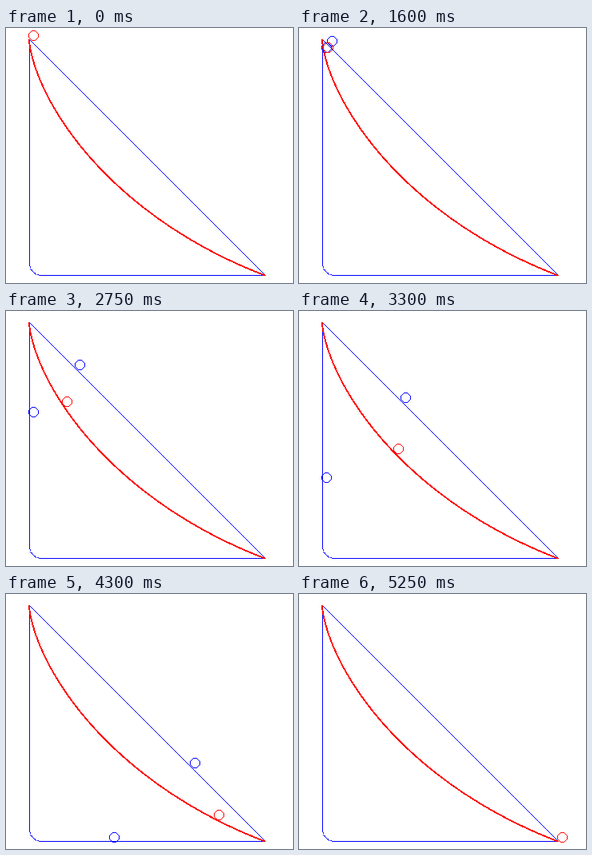
A matplotlib script that plays this animation: 359 px wide and 319 px high, repeating every 7250 ms.

```python
import math

import numpy as np
import matplotlib.pyplot as plt
from matplotlib.animation import FuncAnimation

W, H, DPI = 359, 319, 64
STEP = 50                 # ms per frame
FRAMES = 145
WAIT = 19                 # frames before the release

X0, Y0, SIDE = 29, 14, 295    # track start and its drop
BEND = 15                     # corner radius
BALL_X, BALL_Y = 34.15, 9.15  # ball centre at the start
BALL_R = 6
ACC = 0.0903                  # fall distance = ACC * n^2

THETA = 2.41201               # cycloid angle at the end of the track
R = SIDE / (1 - math.cos(THETA))
OMEGA = math.sqrt(2 * ACC / R)

DROP_END = math.sqrt((SIDE - BEND) / ACC)
SPEED = 2 * math.sqrt(ACC * SIDE)
BEND_END = 58.66

RED, BLUE = (255, 0, 0), (0, 0, 255)


def cycloid(theta):
    return R * (theta - np.sin(theta)), R * (1 - np.cos(theta))


def corner(a):
    return BEND * (1 - np.cos(a)), SIDE - BEND * (1 - np.sin(a))


def slope_pos(n):
    d = min(ACC / 2 * n * n, SIDE)
    return d, d


def curve_pos(n):
    theta = OMEGA * n
    return cycloid(theta) if theta < THETA else (SIDE, SIDE)


def corner_pos(n):
    if n < DROP_END:
        return 0, ACC * n * n
    if n < BEND_END:
        return corner(math.pi / 2 * (n - DROP_END) / (BEND_END - DROP_END))
    return min(BEND + SPEED * (n - BEND_END), SIDE), SIDE


def dots(img, x, y, color):
    img[np.rint(y).astype(int), np.rint(x).astype(int)] = color


def stroke(img, x, y, color, half):
    """Fill every pixel whose centre lies within half of the curve."""
    for px, py in zip(x, y):
        c, r = int(px) - 2, int(py) - 2
        gy, gx = np.mgrid[r:r + 6, c:c + 6]
        img[r:r + 6, c:c + 6][np.hypot(gx - px, gy - py) <= half] = color


def ball(img, cx, cy, color):
    a = np.arange(-4, 5)
    b = np.sqrt(BALL_R ** 2 - a * a)
    for s in (-1, 1):
        dots(img, cx + a, cy + s * b, color)
        dots(img, cx + s * b, cy + a, color)


def make_tracks():
    img = np.full((H, W, 3), 255, np.uint8)
    run = np.arange(SIDE + 1)
    dots(img, X0 + run, Y0 + run, BLUE)
    img[Y0:Y0 + SIDE - BEND + 1, X0] = BLUE
    img[Y0 + SIDE, X0 + BEND:X0 + SIDE + 1] = BLUE
    x, y = corner(np.linspace(0, math.pi / 2, 22))
    dots(img, X0 + x, Y0 + y, BLUE)
    x, y = cycloid(np.linspace(0, THETA, 1500))
    stroke(img, X0 + x - 0.5, Y0 + y, RED, 0.95)
    return img


tracks = make_tracks()
racers = [(slope_pos, BLUE), (corner_pos, BLUE), (curve_pos, RED)]

fig = plt.figure(figsize=(W / DPI, H / DPI), dpi=DPI, facecolor="white")
view = fig.figimage(tracks, origin="upper")


def draw(i):
    n = max(0, i - WAIT)
    img = tracks.copy()
    for pos, color in racers:
        x, y = pos(n)
        ball(img, int(BALL_X + x), int(BALL_Y + y), color)
    view.set_data(img)
    return [view]


anim = FuncAnimation(fig, draw, frames=FRAMES, interval=STEP,
                     init_func=lambda: draw(0), repeat=True, repeat_delay=0)
plt.show()
```
